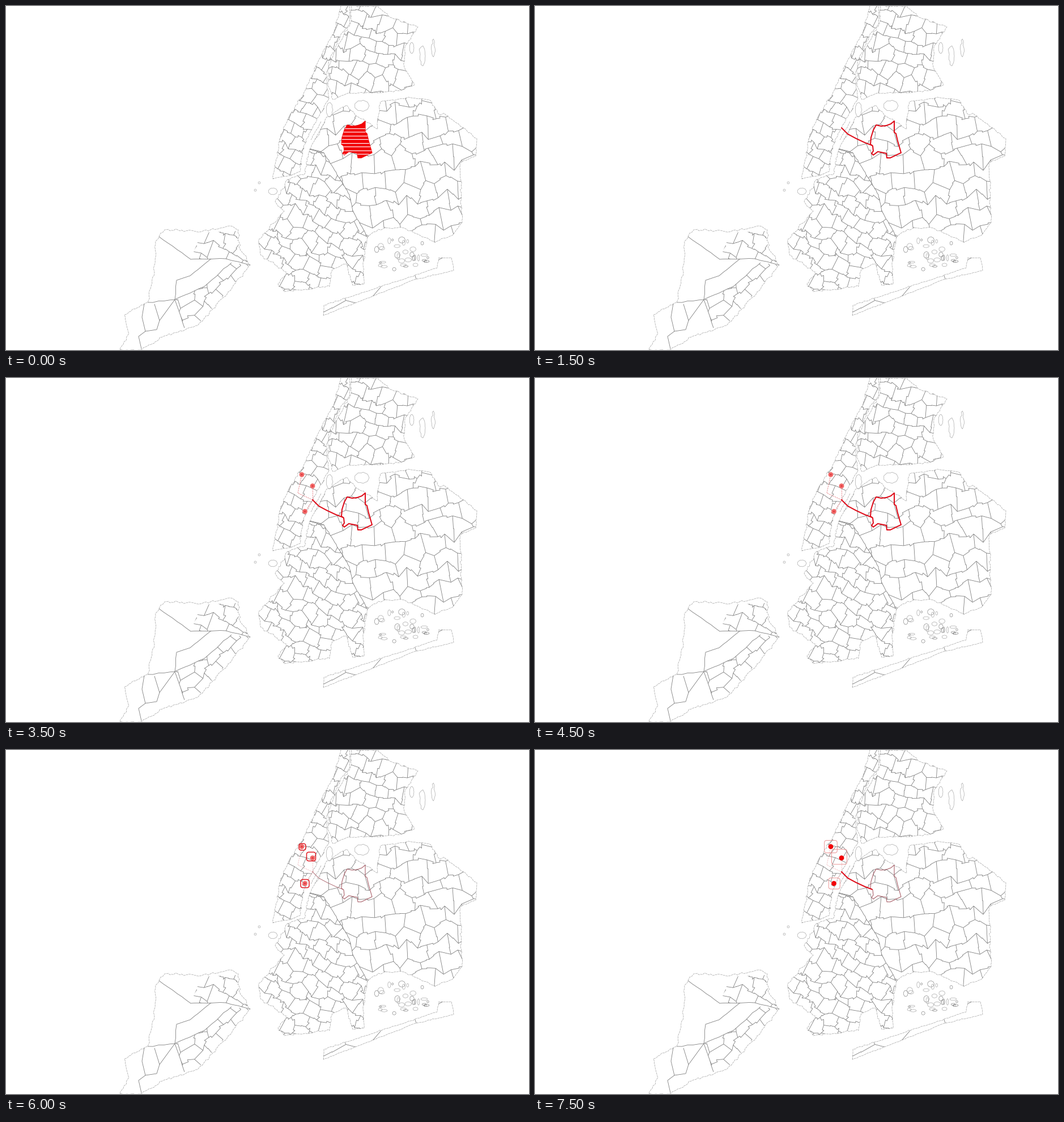
Write a matplotlib script that moves like this. It is 923 px wide and 607 px high and loops after 8 s.

```python
import numpy as np
import matplotlib.pyplot as plt
from matplotlib.animation import FuncAnimation
from matplotlib.collections import LineCollection
from matplotlib.patches import Circle, FancyBboxPatch, Polygon

W, H, DPI = 923, 607, 100
PX = 72 / DPI
RED, DEEP, ROSE, MUTED = "#f20005", "#de0a18", "#f26a6a", "#a0505a"
GREY, PALE = "#787878", "#9c9c9c"

fig = plt.figure(figsize=(W / DPI, H / DPI), dpi=DPI, facecolor="white")
ax = fig.add_axes([0, 0, 1, 1])
ax.set(xlim=(0, W), ylim=(H, 0))
ax.axis("off")
rng = np.random.default_rng(7)


def pts(*xy):
    return np.array(xy, float).reshape(-1, 2)


def rough(p, amp=0.8, step=4):
    """Subdivide a path and shake the new points."""
    out = []
    for a, b in zip(p[:-1], p[1:]):
        n = max(1, int(np.hypot(*(b - a)) / step))
        t = np.arange(n)[:, None] / n
        out.append(a + (b - a) * t + rng.normal(0, amp, (n, 2)) * (t > 0))
    return np.vstack(out + [p[-1:]])


def closed(p):
    return np.vstack([p, p[:1]])


def strokes(lines, color=GREY, lw=0.8, **kw):
    return ax.add_collection(LineCollection(lines, colors=color, linewidths=lw * PX, **kw))


def coast(*lines):
    strokes(lines, PALE, 0.65, linestyles=[(0, (6, 1.5))])


def island(x, y, rx, ry, amp=0.8, color=PALE):
    t = np.linspace(0, 2 * np.pi, 10)
    ring = np.c_[x + rx * np.cos(t), y + ry * np.sin(t)]
    strokes([rough(ring, amp)], color, 0.6)


def jog(a, b):
    """Border between two corners, often with a small step in it."""
    if rng.random() < 0.35:
        return np.array([a, b])
    d = b - a
    side = np.array([-d[1], d[0]]) / np.hypot(*d) * rng.uniform(-4, 4)
    c = a + d * rng.uniform(0.3, 0.7)
    return np.array([a, c, c + side, b])


def districts(outline, angle, w, h, jitter=0.2):
    """Fill an outline with uneven bricks, each 2w by h, turned by angle."""
    lo, hi = outline.min(0), outline.max(0)
    n = int(np.hypot(*(hi - lo)) / 2 / min(w, h)) + 2
    c, s = np.cos(np.radians(angle)), np.sin(np.radians(angle))
    j, i = np.mgrid[-n:n + 1, -n:n + 1]
    node = np.stack([i, j], -1) + rng.normal(0, jitter, i.shape + (2,))
    node = node * (w, h) @ np.array([[c, s], [-s, c]]) + (lo + hi) / 2
    lines = []
    for r in range(2 * n):
        for k in range(2 * n):
            lines.append(jog(node[r, k], node[r, k + 1]))
            if (r + k) % 2:
                lines.append(jog(node[r, k], node[r + 1, k]))
    cells = strokes(lines)
    cells.set_clip_path(Polygon(outline).get_path(), ax.transData)


# Land
bronx = rough(closed(pts(
    609, 0, 657, 1, 678, 20, 727, 37, 704, 72, 703, 108, 721, 139, 700, 148, 663, 153,
    603, 154, 577, 165, 568, 135, 570, 95, 594, 57, 609, 28)))
manhattan = rough(closed(pts(
    592, -3, 579, 45, 550, 100, 525, 155, 497, 200, 483, 235, 471, 305, 505, 298, 519, 292,
    525, 248, 541, 215, 570, 163, 565, 120, 590, 52, 606, 32, 608, -3)))
seam = rough(pts(536, 253, 561, 259, 580, 290, 606, 333, 612, 361, 638, 408), 0.4)
queens = rough(pts(
    536, 253, 554, 222, 566, 196, 600, 175, 618, 194, 634, 203, 656, 217, 656, 199, 661, 169,
    715, 162, 748, 166, 765, 192, 773, 189, 831, 234, 829, 265, 801, 276, 805, 382, 787, 405,
    757, 417, 699, 391, 657, 394, 638, 408))
brooklyn = rough(pts(
    638, 408, 630, 452, 632, 491, 612, 493, 600, 455, 576, 465, 571, 495, 491, 504, 480, 490,
    495, 470, 450, 440, 446, 412, 491, 362, 475, 345, 497, 306, 526, 298, 536, 253), 1)
staten = rough(closed(pts(
    270, 407, 280, 395, 345, 398, 395, 388, 410, 395, 411, 425, 431, 457, 400, 495, 338, 564,
    280, 582, 238, 607, 201, 607, 217, 578, 209, 545, 250, 523, 262, 470, 264, 420)), 1)
spit = closed(pts(560, 546, 561, 528, 632, 505, 761, 462, 764, 444, 786, 444, 790, 467, 720, 483, 650, 511))
coast(bronx, manhattan, queens, brooklyn, staten, rough(spit, 0.5))
strokes([seam])

districts(bronx, 12, 13, 22)
districts(manhattan, 27, 11, 21, 0.1)
districts(np.vstack([queens, seam[::-1]]), -8, 18, 28)
districts(np.vstack([brooklyn, seam]), 28, 13, 21)
districts(spit, -20, 45, 90, 0.1)

# Staten Island: through roads, then small districts on its north and south-east sides
cross = pts(270, 407, 326, 447, 388, 446, 431, 457)
spine = pts(362, 446, 325, 476, 301, 484, 298, 518, 315, 568)
ridge = pts(250, 523, 298, 518, 350, 495, 398, 453)
strokes([rough(p, 0.4, 9) for p in (cross, spine, ridge)])
strokes([pts(244, 525, 240, 549, 246, 574, 266, 571, 271, 555, 262, 526),
         pts(246, 574, 234, 583, 239, 605), pts(271, 555, 298, 518)])
districts(np.vstack([cross[1:], pts(411, 425, 408, 397, 345, 400)]), 20, 14, 25)
districts(np.vstack([ridge[1:], pts(429, 457, 400, 493, 338, 562, 315, 567)]), -45, 16, 24)

# Small islands and the marsh in the bay
for x, y, rx, ry in [(628, 176, 13, 10), (571, 183, 6, 13), (471, 327, 8, 6), (447, 312, 2, 2),
                     (440, 325, 2, 2), (735, 88, 5, 18), (754, 74, 3, 16), (716, 74, 4, 10)]:
    island(x, y, rx, ry)
for dx in (0, 7):
    coast(rough(pts(556 + dx, 204, 538 + dx, 236), 0.3))
for k in range(34):
    a, r = rng.uniform(0, 2 * np.pi), np.sqrt(rng.random())
    island(694 + 60 * r * np.cos(a), 438 + 28 * r * np.sin(a),
           *rng.uniform(1.5, 6, 2), 1.5, GREY if k % 3 == 0 else PALE)

# Highlighted district
zone = pts(602, 210, 611, 212, 620, 211, 628, 208, 634, 203, 634, 223, 637, 225, 640, 238,
           646, 259, 627, 268, 621, 268, 620, 260, 605, 257, 597, 263, 594, 260, 597, 256,
           596, 247, 592, 244, 593, 232, 597, 219)
fill = ax.add_patch(Polygon(zone, fc=RED, ec=RED, lw=1.2 * PX, zorder=3))
stripes = ax.hlines(np.arange(215.5, 265, 6.5), 585, 650, color="white", lw=1.2 * PX, zorder=4)
stripes.set_clip_path(fill)
outline = ax.add_patch(Polygon(zone, fill=False, joinstyle="round", zorder=5))

# Trunk line, its branches and their end stops
trunk = pts(595, 246, 582, 241, 567, 234, 552, 226, 546, 220, 541, 215)
line, = ax.plot([], [], solid_capstyle="round", solid_joinstyle="round", zorder=5)
stops = pts(522, 170.5, 541, 190.5, 527.5, 235.5)
routes = [pts(541, 215, 515, 203, 522, 170), pts(541, 215, 541, 190), pts(543, 213, 528, 236)]
branches = [ax.plot(*r.T, color="#e06068", lw=0.8 * PX, ls=(0, (3, 1.5)), zorder=4)[0] for r in routes]
dots = [ax.add_patch(Circle(s, 4.4, lw=0, zorder=7)) for s in stops]
cores = [ax.add_patch(Circle(s, 1.6, fc="#e03c40", lw=0, zorder=8)) for s in stops]


def frame(centre, w, h, color, lw):
    x, y = centre - np.array([w, h]) / 2
    return ax.add_patch(FancyBboxPatch((x, y), w, h, boxstyle="round,pad=0,rounding_size=4",
                                       fill=False, ec=color, lw=lw * PX, zorder=6))


near = [frame(c, w, w - 0.5, "#e01a22", 1.5)
        for c, w in zip(stops + pts(1, 0.5, -2.5, -2.5, 0, 0.2), (12, 16, 15))]
far = [frame(c, w, w - 0.5, "#e88a8a", 0.9)
       for c, w in zip(stops + pts(0, 0, -4, -2, 0.7, 0), (22.5, 27, 20))]


def show(items, on):
    for item in items:
        item.set_visible(bool(on))


def draw(i):
    late = i >= 10
    blink = 6 <= i < 10 and i % 2 == 0
    filled = i in (0, 14) or blink
    show([fill, stripes], filled)
    show([outline], not filled)
    outline.set(edgecolor=MUTED if late else DEEP, linewidth=(1 if late else 2) * PX)

    reach = (0, 2, 5)[i] if i < 3 else len(trunk)
    thin = 10 <= i < 15
    line.set_data(*trunk[:reach].T)
    line.set(color=MUTED if thin else DEEP, linewidth=(0.8 if thin else 2) * PX)

    show(branches[:2], i >= 4)
    show(branches[2:], i >= 5)
    for b in branches:
        b.set_alpha(0.45 if late else 0.9)

    close = i in (10, 12)
    solid = blink or late and not close
    show(dots, i >= 6)
    show(cores, i >= 6 and not solid)
    for d in dots:
        d.set_facecolor(RED if solid else ROSE)
    show(near, close)
    show(far, late and not close)
    return []


anim = FuncAnimation(fig, draw, frames=16, interval=500, init_func=lambda: draw(0),
                     repeat=True, repeat_delay=0, blit=False)
plt.show()
```
